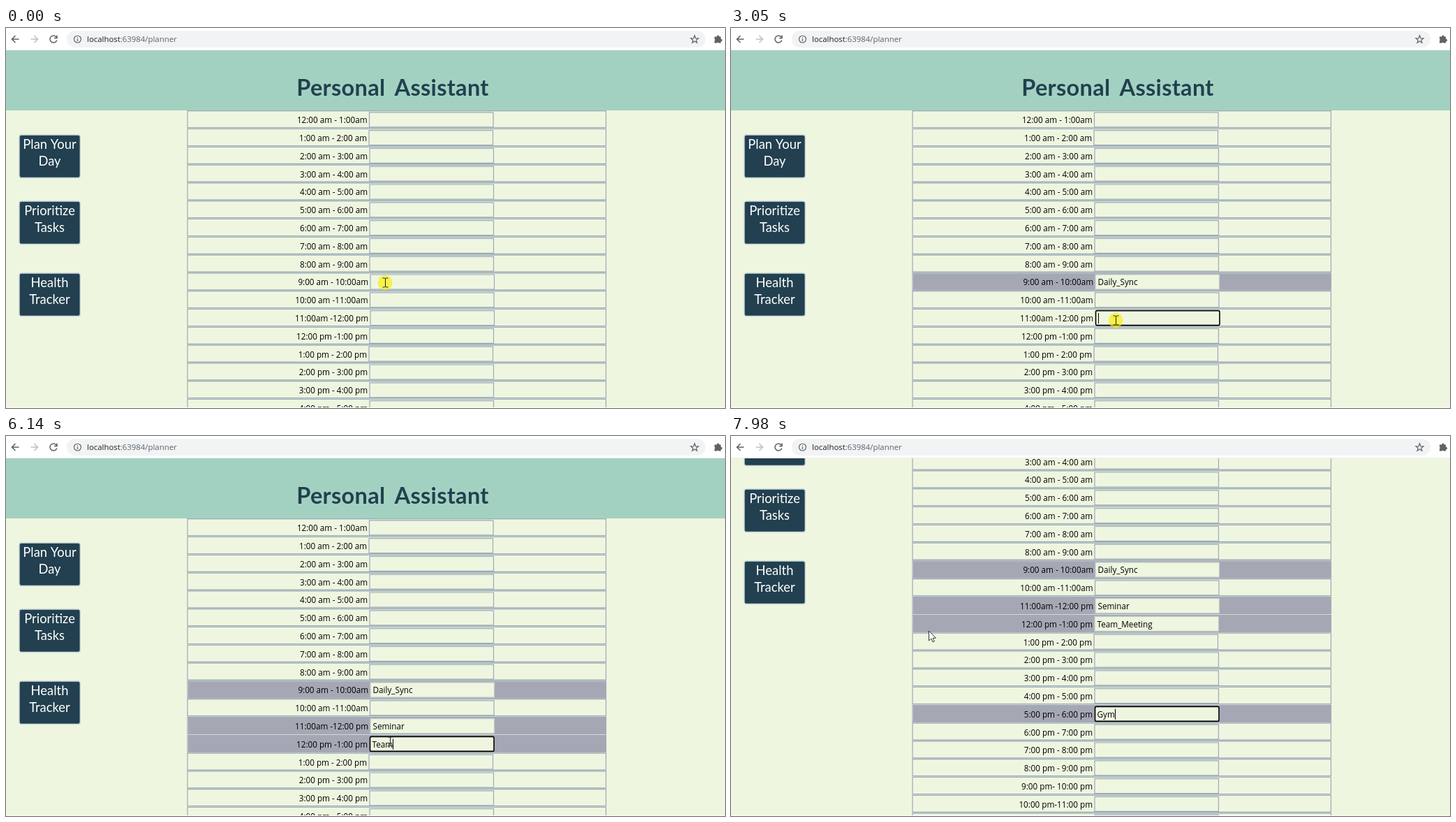
An HTML page with a canvas for the animation above (8000 ms loop, 1030 by 544 pixels).

```html
<!DOCTYPE html>
<html lang="en">
<head>
<meta charset="utf-8">
<title>Personal Assistant</title>
<style>
  html, body { margin: 0; width: 100%; height: 100%; overflow: hidden; background: #eff6e0; }
  canvas { display: block; }
</style>
</head>
<body>
<canvas id="stage" width="1030" height="544"></canvas>
<script>
const ctx = document.getElementById('stage').getContext('2d');
const LOOP = 8000, PAGE = '#eff6e0', NAVY = '#22404f', LINE = '#9aa9b6', BUSY = '#a5a8b4', ICON = '#5f6368';
const SANS = '"Open Sans", "Noto Sans", sans-serif', ROUND = 'Lato, sans-serif';

const oddLabels = {
  0: '12:00 am - 1:00am', 9: '9:00 am - 10:00am', 10: '10:00 am -11:00am',
  11: '11:00am -12:00 pm', 12: '12:00 pm -1:00 pm', 21: '9:00 pm- 10:00 pm',
  22: '10:00 pm-11:00 pm', 23: '11:00 pm-12:00 am'
};
const oddLefts = { 0: 520.5, 1: 520, 9: 522, 10: 521.5, 11: 522, 13: 520 };
const rows = Array.from({ length: 24 }, (_, i) => {
  const half = i < 12 ? 'am' : 'pm';
  return {
    label: oddLabels[i] || `${i % 12}:00 ${half} - ${i % 12 + 1}:00 ${half}`,
    left: oddLefts[i] || 521,
    top: 118.2 + 25.8 * i
  };
});

// time, focused row, its text, caret visible
const edits = [
  [90, 9, '', 1], [630, 9, '', 0], [1090, 9, 'D', 1], [1320, 9, 'Da', 1],
  [1490, 9, 'Dail', 1], [1650, 9, 'Daily', 1], [2030, 9, 'Daily_Syn', 1],
  [2110, 9, 'Daily_Sync', 1], [2570, 9, 'Daily_Sync', 0],
  [3050, 11, '', 1], [3510, 11, 'Semi', 1], [3580, 11, 'Seminar', 1], [4110, 11, 'Seminar', 0],
  [4350, 12, '', 1], [4900, 12, '', 0], [5440, 12, 'T', 1], [5820, 12, 'Te', 1],
  [5970, 12, 'Tea', 1], [6140, 12, 'Team', 1], [6210, 12, 'Team_Meeting', 1], [6750, 12, 'Team_Meeting', 0],
  [7130, 17, '', 1], [7520, 17, 'Gy', 1], [7600, 17, 'Gym', 1]
];
const busyFrom = { 9: 170, 11: 3130, 12: 4500, 17: 7210 };
const clicks = [[0, 170], [2970, 3130], [4270, 4500], [7130, 7210]];
// time, x, y of the pointer
const pointerPath = [
  [0, 543, 364], [2970, 543, 364], [2970, 551, 418], [3730, 551, 418], [4270, 550, 437],
  [6210, 550, 437], [6210, 561, 345], [6360, 561, 345], [6900, 561, 396], [7590, 561, 396],
  [7740, 765, 178], [7990, 283, 279]
];
const TICK = 77;

function pointerAt(t) {
  const next = pointerPath.findIndex(key => key[0] > t);
  const [t0, x0, y0] = pointerPath[next < 0 ? pointerPath.length - 1 : next - 1];
  if (next < 0) return [x0, y0];
  const [t1, x1, y1] = pointerPath[next];
  const p = Math.min(1, (Math.floor((t - t0) / TICK) + 1) * TICK / (t1 - t0));
  return [x0 + (x1 - x0) * p, y0 + (y1 - y0) * p];
}

function rect(x, y, w, h, color) {
  ctx.fillStyle = color;
  ctx.fillRect(x, y, w, h);
}

function text(str, x, y, size, color, align = 'left', font = SANS, weight = 400) {
  ctx.font = `${weight} ${size}px ${font}`;
  ctx.textAlign = align;
  ctx.fillStyle = color;
  ctx.fillText(str, x, y);
}

function box(x, y, w, h, r, fill, stroke, width = 1) {
  ctx.beginPath();
  ctx.roundRect(x, y, w, h, r);
  if (fill) { ctx.fillStyle = fill; ctx.fill(); }
  if (stroke) { ctx.strokeStyle = stroke; ctx.lineWidth = width; ctx.stroke(); }
}

function path(d, x, y, stroke, width, fill) {
  const shape = new Path2D(d);
  ctx.save();
  ctx.translate(x, y);
  if (fill) { ctx.fillStyle = fill; ctx.fill(shape); }
  if (stroke) { ctx.strokeStyle = stroke; ctx.lineWidth = width; ctx.stroke(shape); }
  ctx.restore();
}

function drawBrowserBar() {
  rect(0, 0, 1030, 32, '#fff');
  rect(0, 31, 1030, 1, '#eceeee');
  box(87, 4, 915, 24, 12, '#f1f3f4');
  const arrow = 'M5.5 0H-4.5M.5-5L-4.5 0L.5 5';
  path(arrow, 13, 16, ICON, 1.6);
  ctx.save();
  ctx.scale(-1, 1);
  path(arrow, -41, 16, '#bdc1c6', 1.6);
  ctx.restore();
  path('M4.2-2.8A5 5 0 1 0 4.8 1.4M5-5.5V-1.5H1', 68, 16, ICON, 1.6);
  path('M5 0A5 5 0 1 1-5 0A5 5 0 1 1 5 0M0-.8V3M0-3V-1.7', 102.5, 16, ICON, 1.2);
  text('localhost', 116, 20, 11.4, '#202124');
  const hostWidth = ctx.measureText('localhost').width;
  text(':63984/planner', 116 + hostWidth, 20, 11.4, ICON);
  let star = '';
  for (let i = 0; i < 10; i++) {
    const r = i % 2 ? 2.4 : 5.8, a = i * Math.PI / 5;
    star += `${i ? 'L' : 'M'}${r * Math.sin(a)} ${-r * Math.cos(a)}`;
  }
  path(star + 'Z', 986.5, 16.5, ICON, 1.2);
  path('M-5-3H-2A2 2 0 1 1 2-3H4V0A2 2 0 1 1 4 4V6H1A2 2 0 0 0-2 6H-5V3A2 2 0 0 0-5 0Z', 1020, 15.5, null, 0, ICON);
}

function drawButton(y, first, second) {
  box(19, y + 1, 87.3, 61.5, 3, NAVY, '#c6d5d8', 1.4);
  text(first, 62.5, y + 21, 18.4, '#fff', 'center', ROUND);
  text(second, 62.5, y + 45, 18.4, '#fff', 'center', ROUND);
}

function drawRow(row, busy, value, focused, caret) {
  const { top, left } = row;
  rect(260, top, 600, 25.8, '#dfe8dc');
  box(260, top + .5, 599.5, 24, 0, PAGE, LINE, 1.2);
  if (busy) rect(261, top + 1, 598, 24, BUSY);
  text(row.label, left - 3, top + 18, 11.7, '#000', 'right');
  if (focused) box(left + .5, top + 2.6, 177.5, 21, 2, PAGE, '#000', 1.6);
  else box(left, top + 2.6, 177.5, 21, 0, PAGE, busy ? '#c4c9c8' : LINE, 1.2);
  text(value, left + 3.5, top + 18, 11.7, '#000');
  const end = left + 3.5 + ctx.measureText(value).width;
  if (focused && caret) rect(Math.round(end), top + 6, 1, 15, '#000');
  if (focused && value === 'Team_Meeting') {
    ctx.beginPath();
    for (let x = left + 4; x < end; x += 2) ctx.lineTo(x, top + 20 + (x - left) / 2 % 2);
    ctx.strokeStyle = '#e0403a';
    ctx.lineWidth = 1;
    ctx.stroke();
  }
}

function drawPointer(t) {
  const [x, y] = pointerAt(t);
  const pressed = clicks.some(([from, to]) => t >= from && t < to);
  if (pressed) box(x - 10.5, y - 10, 21, 21, 10.5, 'rgba(250, 238, 0, .65)');
  if (x > 700 || x < 520) path('M0 0V14L3.3 11L5.6 16L7.8 15L5.6 10.2H10Z', x + .5, y, '#333', 1, '#fff');
  else path('M-4-6.5H-1L0-5.5L1-6.5H4M0-6V6M-4 6.5H-1L0 5.5L1 6.5H4', x + .5, y + .5, '#222', 1);
}

function draw(t) {
  const scroll = t < 6210 ? 0 : 172;
  const past = edits.filter(edit => edit[0] <= t);
  const values = Object.fromEntries(past.map(([, row, value]) => [row, value]));
  const [, focus, , caret] = past[past.length - 1] || [0, -1, '', 0];

  rect(0, 0, 1030, 544, PAGE);
  ctx.save();
  ctx.translate(0, -scroll);
  rect(0, 32, 1030, 86, '#a3d1c1');
  ctx.letterSpacing = '0.3px';
  ctx.wordSpacing = '5px';
  text('Personal Assistant', 554, 97, 32.5, NAVY, 'center', ROUND, 700);
  ctx.letterSpacing = ctx.wordSpacing = '0px';
  drawButton(152, 'Plan Your', 'Day');
  drawButton(247, 'Prioritize', 'Tasks');
  drawButton(350, 'Health', 'Tracker');
  rows.forEach((row, i) => drawRow(row, t >= busyFrom[i], values[i] || '', i === focus, caret));
  ctx.restore();
  drawBrowserBar();
  rect(0, 543, 1030, 1, '#fbfdf7');
  drawPointer(t);
}

function tick() {
  draw(performance.now() % LOOP);
  requestAnimationFrame(tick);
}
tick();
</script>
</body>
</html>
```
